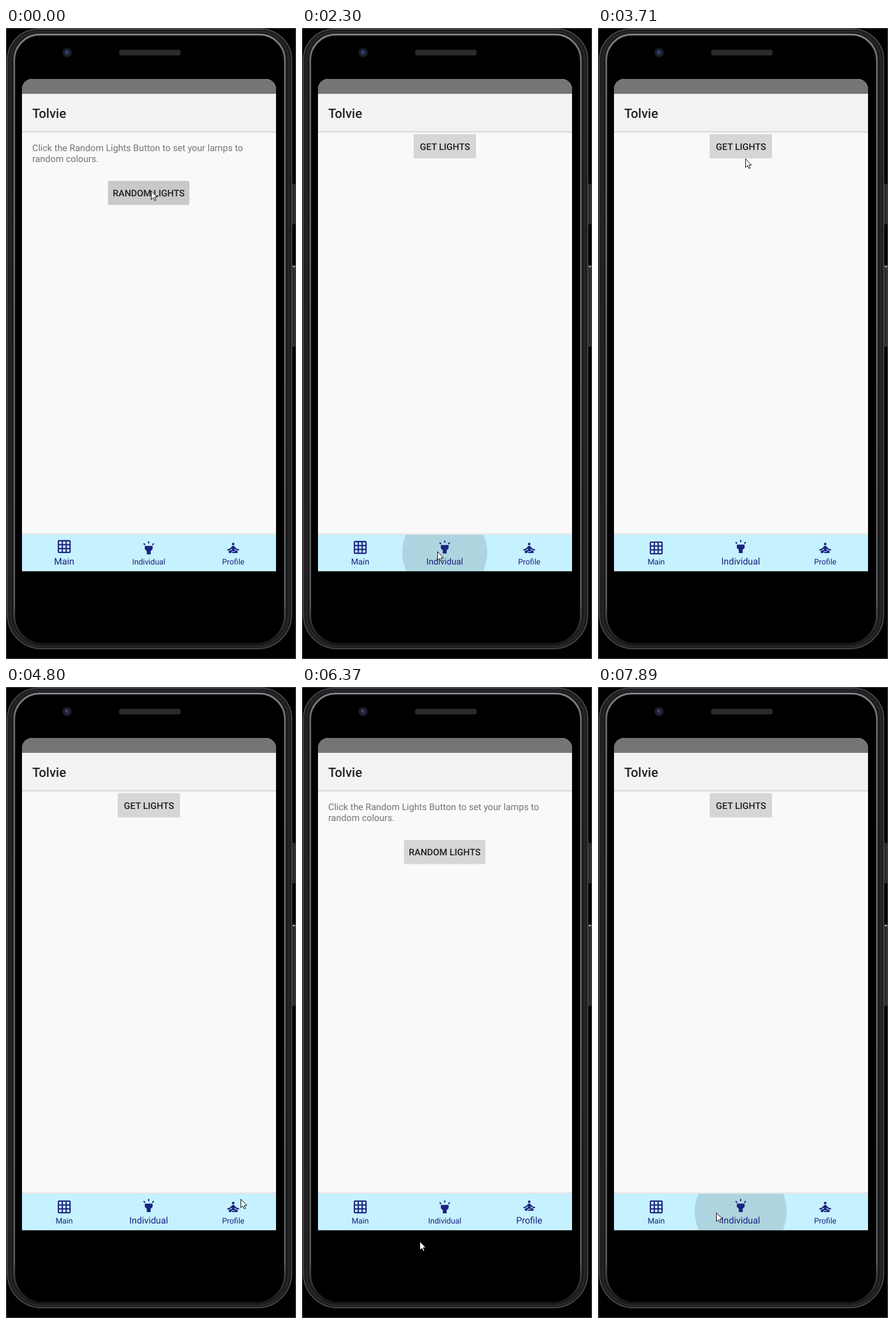
Recreate the animation shown at these times as an HTML page. Size 508x1102 px, loop 8000 ms.

```html
<!DOCTYPE html>
<html lang="en">
<head>
<meta charset="utf-8">
<title>Lamp control app</title>
<style>
  html, body { margin: 0; width: 100%; height: 100%; overflow: hidden; background: #000; }
  svg { display: block; width: 508px; height: 1102px; }
  text { font-family: Roboto, sans-serif; text-rendering: geometricPrecision; }
  .button { font-weight: 500; font-size: 16px; fill: #1f2020; text-anchor: middle; }
  .body { font-size: 16.05px; fill: #757575; }
  .tab { color: #1a237e; }
  .tab text { text-anchor: middle; fill: currentColor; }
</style>
</head>
<body>
<svg viewBox="0 0 508 1102">
  <defs>
    <linearGradient id="rim" x2="0" y2="1">
      <stop offset="0" stop-color="#838388"/>
      <stop offset=".05" stop-color="#66666b"/>
      <stop offset=".93" stop-color="#55555a"/>
      <stop offset="1" stop-color="#161618"/>
    </linearGradient>
    <linearGradient id="below" x2="0" y2="1">
      <stop offset="0" stop-opacity=".16"/>
      <stop offset="1" stop-opacity="0"/>
    </linearGradient>
    <linearGradient id="above" x2="0" y2="1">
      <stop offset="0" stop-opacity="0"/>
      <stop offset="1" stop-opacity=".1"/>
    </linearGradient>
    <clipPath id="screen"><path d="M28 948.500V107a18 18 0 0 1 18-18H455a18 18 0 0 1 18 18V948.500z"/></clipPath>
    <clipPath id="bar"><rect x="28" y="885" width="445" height="64"/></clipPath>
  </defs>

  <!-- phone body -->
  <rect x=".5" y=".5" width="507" height="1101" fill="none" stroke="#4a4a4c"/>
  <g fill="#2b2b2d">
    <rect x="501" y="272" width="7" height="71" rx="2"/>
    <rect x="501" y="415" width="7" height="142" rx="2"/>
  </g>
  <path d="M506.500 274v67M506.500 418v137" stroke="#48484b"/>
  <rect x="502" y="415" width="5" height="3" fill="#88888b"/>
  <g id="bezel"></g>
  <circle cx="107" cy="43" r="8" fill="#1d1d22"/>
  <circle cx="107" cy="43" r="4.500" fill="#222b55"/>
  <circle cx="106" cy="42" r="1.500" fill="#536099"/>
  <rect x="198" y="38" width="108" height="10" rx="4" fill="#2a2a2a"/>

  <!-- app -->
  <g clip-path="url(#screen)">
    <rect x="28" y="89" width="445" height="860" fill="#f9f9f9"/>
    <rect x="28" y="89" width="445" height="26" fill="#757575"/>
    <rect x="28" y="115" width="445" height="65" fill="#f3f3f3"/>
    <rect x="28" y="180" width="445" height="4" fill="url(#below)"/>
    <text x="46" y="156.500" font-size="22.670" font-weight="500" fill="#222">Tolvie</text>

    <g id="randomPage">
      <text class="body" x="46" y="214.500">Click the Random Lights Button to set your lamps to</text>
      <text class="body" x="46" y="233.500">random colours.</text>
      <rect x="178.500" y="267.500" width="143" height="42" rx="2.500" opacity=".13"/>
      <rect id="randomButton" x="179" y="267" width="142" height="41" rx="2"/>
      <text class="button" x="250" y="294">RANDOM LIGHTS</text>
    </g>
    <g id="lightsPage">
      <rect x="195.500" y="186" width="109.500" height="42" rx="2.500" opacity=".13"/>
      <rect x="196" y="185.500" width="108.500" height="41" rx="2" fill="#d5d7d6"/>
      <text class="button" x="250.500" y="212.500">GET LIGHTS</text>
    </g>

    <rect x="28" y="881" width="445" height="4" fill="url(#above)"/>
    <rect x="28" y="885" width="445" height="64" fill="#c6f1ff"/>
    <circle id="ripple" cy="916" opacity=".12" clip-path="url(#bar)"/>
    <g class="tab">
      <g fill="none" stroke="currentColor" stroke-width="2">
        <rect x="3" y="3" width="18" height="18" rx="1"/>
        <path d="M9 3v18M15 3v18M3 9h18M3 15h18"/>
      </g>
      <text y="937">Main</text>
    </g>
    <g class="tab">
      <g fill="currentColor">
        <path d="M6 14l3 3v5h6v-5l3-3V9H6zM11 2h2v3h-2zM3.500 5.900l1.400-1.400L7 6.600 5.600 8zM17 6.600l2.100-2.100 1.400 1.400L18.400 8z"/>
      </g>
      <text y="937">Individual</text>
    </g>
    <g class="tab">
      <g fill="currentColor">
        <circle cx="12" cy="6" r="2"/>
        <path d="M21 16v-2c-2.200 0-4.200-1-5.600-2.700l-1.300-1.600C13.700 9.300 13.100 9 12.500 9h-1c-.6 0-1.200.3-1.600.7l-1.300 1.600C7.200 13 5.200 14 3 14v2c2.800 0 5.200-1.200 7-3.200V15l-3.900 1.500C5.400 16.800 5 17.500 5 18.200 5 19.200 5.800 20 6.800 20H9v-.5c0-1.400 1.100-2.500 2.500-2.500h3a.5.5 0 0 1 0 1h-3c-.8 0-1.500.7-1.500 1.500v.5h7.100c.9 0 1.700-.6 1.900-1.400.2-.8-.3-1.600-1.100-1.900L14 15v-2.200c1.800 2 4.200 3.200 7 3.200z"/>
      </g>
      <text y="937">Profile</text>
    </g>
  </g>

  <path id="cursor" d="M.5.5V15.500L4 12.300 6.500 17.500 8.700 16.600 6.300 11.300H10.800z" fill="#fff" stroke="#000"/>
</svg>

<script>
const LOOP = 8000;
const MAIN = 0, INDIVIDUAL = 1, PROFILE = 2;

const easeIn = power => u => u ** power;
const easeOut = power => u => 1 - (1 - u) ** power;

// Each move runs from the previous resting place to `to`, in visible steps.
const REST = [254, 284];
const MOVES = [
  { start: 650, step: 137, count: 5, to: [163, 912], ease: easeOut(2.3) },
  { start: 1350, step: 140, count: 5, to: [237, 914], ease: easeOut(1.7) },
  { start: 2810, step: 120, count: 6, to: [262, 271], ease: easeIn(1.5) },
  { start: 3560, step: 150, count: 4, to: [258, 224], ease: easeOut(3.5) },
  { start: 4380, step: 132, count: 6, to: [415, 912], ease: easeOut(3.3) },
  { start: 5860, step: 124, count: 9, to: [137, 920], ease: easeIn(1.6), via: [65, 1027] },
  { start: 7370, step: 120, count: 2, to: [207, 918], ease: easeOut(1.5) }
];

// `growth` is how far the label has grown when the tap first shows.
const TAPS = [
  { at: -LOOP, tab: MAIN, growth: 1 },
  { at: 2300, tab: INDIVIDUAL, growth: 0.65 },
  { at: 5450, tab: PROFILE, growth: 1 },
  { at: 7100, tab: MAIN, growth: 0.65 },
  { at: 7770, tab: INDIVIDUAL, growth: 0.65 }
];
const RIPPLE_STEP = 120, RIPPLE_LIFE = 260;

const byId = id => document.getElementById(id);
const tabs = [...document.querySelectorAll('.tab')];
const tabX = index => 102 + 148 * index;
const set = (element, attributes) => {
  for (const name in attributes) element.setAttribute(name, attributes[name]);
};

function bezelPath(inset) {
  const left = 2.5 + inset, right = 500.5 - inset;
  const top = 2 + inset * 0.8, bottom = 1084 - inset * 0.7;
  const upper = 54 - inset * 0.8, lower = 60 - inset * 0.8;
  const arc = (r, x, y) => `A${r} ${r} 0 0 1 ${x} ${y}`;
  return `M${left} ${top + upper}${arc(upper, left + upper, top)}H${right - upper}` +
    `${arc(upper, right, top + upper)}V${bottom - lower}${arc(lower, right - lower, bottom)}` +
    `H${left + lower}${arc(lower, left, bottom - lower)}z`;
}

function addBezel(inset, fill, stroke, width) {
  const path = document.createElementNS('http://www.w3.org/2000/svg', 'path');
  set(path, { d: bezelPath(inset), fill, stroke, 'stroke-width': width });
  byId('bezel').append(path);
}

function pointerAt(time) {
  let from = REST;
  for (const { start, step, count, to, ease, via } of MOVES) {
    if (time < start) break;
    const done = Math.min(count, Math.floor((time - start) / step) + 1);
    const u = ease(done / count);
    const origin = from;
    from = to.map((end, axis) => {
      const middle = via ? via[axis] : (origin[axis] + end) / 2;
      return Math.round((1 - u) ** 2 * origin[axis] + 2 * u * (1 - u) * middle + u * u * end);
    });
  }
  return from;
}

function drawTab(tab, index, amount) {
  const [icon, label] = tab.children;
  const x = tabX(index);
  set(icon, { transform: `translate(${x - 13.6} ${894.4 - 2.3 * amount}) scale(1.133)` });
  set(label, { x, 'font-size': 13.65 + 2.3 * amount });
}

function draw(time) {
  const current = TAPS.findLastIndex(tap => tap.at <= time);
  const { at, tab: selected, growth } = TAPS[current];
  const previous = TAPS[Math.max(0, current - 1)].tab;
  const age = time - at;
  const settled = age >= RIPPLE_STEP;
  const progress = settled ? 1 : growth;
  const onLights = selected === INDIVIDUAL;

  set(byId('cursor'), { transform: `translate(${pointerAt(time)})` });
  set(byId('randomButton'), { fill: time < 120 ? '#c8cac9' : '#d5d7d6' });
  set(byId('randomPage'), { display: onLights ? 'none' : 'inline' });
  set(byId('lightsPage'), { display: onLights ? 'inline' : 'none' });
  set(byId('ripple'), { cx: tabX(selected), r: age >= RIPPLE_LIFE ? 0 : settled ? 80.5 : 74.5 });

  tabs.forEach((tab, index) => drawTab(tab, index,
    index === selected ? progress : index === previous ? 1 - progress : 0));
}

addBezel(0, '#1a1a1c', '#48484c', 2);
addBezel(5.5, 'none', '#27272a', 3);
addBezel(12, '#000', 'url(#rim)', 3);

const start = performance.now();
function tick() {
  draw((performance.now() - start) % LOOP);
  requestAnimationFrame(tick);
}
tick();
</script>
</body>
</html>
```
